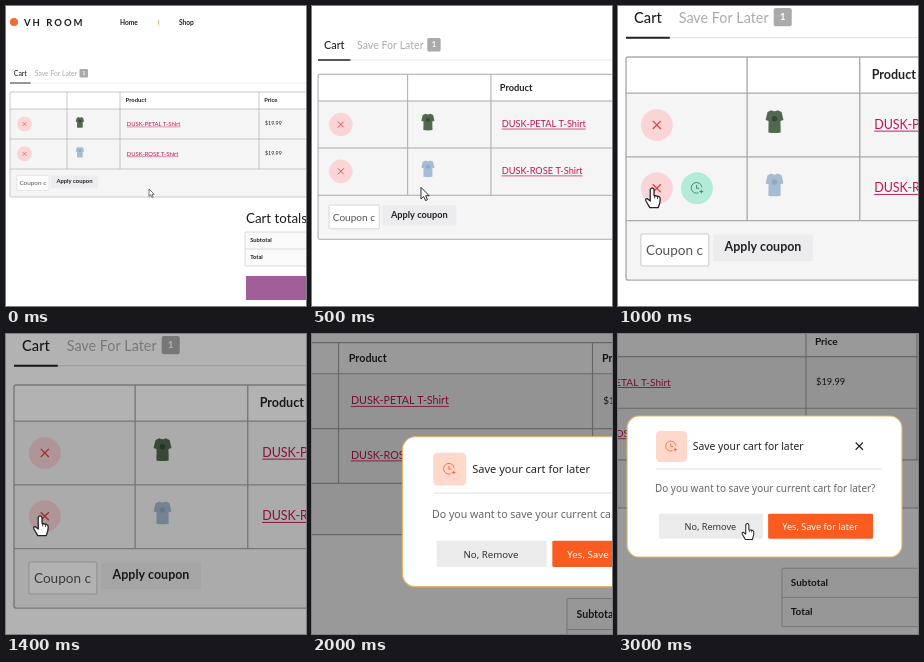
Write an HTML page with a canvas that moves like this. It is 300 px wide and 300 px high and loops after 3.1 s.

```html
<!DOCTYPE html>
<html lang="en">
<head>
<meta charset="utf-8">
<title>Cart demo</title>
<style>
html, body { margin: 0; width: 100%; height: 100%; overflow: hidden; background: #fff; }
canvas { display: block; width: 100vw; height: 100vh; }
</style>
</head>
<body>
<canvas id="stage"></canvas>
<script>
const LOOP = 3100, STEP = 100, SIZE = 300;
const PAGE_FONT = 'Lato, sans-serif';
const POPUP_FONT = '"Noto Sans", sans-serif';
const canvas = document.getElementById('stage');
const ctx = canvas.getContext('2d');

const HAND = new Path2D('M-.9 .7Q0 -.6 .9 .7L.9 3.6 3 4Q3.9 4.3 3.8 5.4L3.6 7 2.9 9.3-1.1 9.3-2.9 6.2Q-3.4 5-2.2 5.1L-.9 6.2Z');
const ARROW = new Path2D('M0 0L0 7.4 1.7 5.8 2.9 8.4 4.1 7.9 3 5.3 5.2 5.3Z');
const SHIRT = new Path2D('M-1.5 -5.2Q0 -4.2 1.5 -5.2L3.3 -4.4 4.2 -.6 2.8 -.2 2.9 5.2Q0 5.8 -2.9 5.2L-2.8 -.2-4.2 -.6-3.3 -4.4Z');

// time, scale, x, y
const CAMERA = [
  [45, 1, 0, 0], [945, 2.125, -0.5, -131.8],
  [1447, 2.125, -0.5, -131.8], [2282, 1.72, -247.2, -154.5]
];
// time, x, y on the page
const POINTER = [
  [0, 143, 183], [500, 69.5, 158], [900, 16.3, 147.6],
  [1900, 16.3, 147.6], [2400, 224, 205], [2900, 224, 205], [3000, 218.9, 200]
];

const clamp = v => Math.min(1, Math.max(0, v));
const smooth = p => p * p * (3 - 2 * p);
const linear = p => p;

function track(keys, t, ease) {
  let i = 0;
  while (i < keys.length - 2 && t >= keys[i + 1][0]) i++;
  const [a, b] = [keys[i], keys[i + 1]];
  const p = ease(clamp((t - a[0]) / (b[0] - a[0])));
  return a.slice(1).map((v, k) => v + (b[k + 1] - v) * p);
}

function box(x1, y1, x2, y2, fill, radius = 0, stroke, width = 0.5) {
  ctx.beginPath();
  ctx.roundRect(x1, y1, x2 - x1, y2 - y1, radius);
  if (fill) { ctx.fillStyle = fill; ctx.fill(); }
  if (stroke) { ctx.strokeStyle = stroke; ctx.lineWidth = width; ctx.stroke(); }
}

function line(x1, y1, x2, y2, color, width = 0.5) {
  ctx.beginPath();
  ctx.moveTo(x1, y1);
  ctx.lineTo(x2, y2);
  ctx.strokeStyle = color;
  ctx.lineWidth = width;
  ctx.stroke();
}

function disc(x, y, r, color) {
  ctx.beginPath();
  ctx.arc(x, y, r, 0, 7);
  ctx.fillStyle = color;
  ctx.fill();
}

function text(str, x, y, size, color = '#222', weight = 400, font = PAGE_FONT, align = 'left') {
  ctx.font = `${weight} ${size}px ${font}`;
  ctx.textAlign = align;
  ctx.fillStyle = color;
  ctx.fillText(str, x, y);
}

function link(str, x, y, size) {
  text(str, x, y, size, '#c41450');
  line(x, y + 1.1, x + ctx.measureText(str).width, y + 1.1, '#c41450', 0.45);
}

function cross(x, y, r, color, width) {
  line(x - r, y - r, x + r, y + r, color, width);
  line(x - r, y + r, x + r, y - r, color, width);
}

function clock(x, y, r, color) {
  ctx.beginPath();
  ctx.arc(x, y, r, 1.2, 6.2);
  ctx.strokeStyle = color;
  ctx.lineWidth = 0.45;
  ctx.stroke();
  line(x, y - r * 0.55, x, y + 0.2, color, 0.45);
  line(x, y + 0.2, x + r * 0.5, y + 0.2, color, 0.45);
  line(x + r * 0.55, y + r * 0.7, x + r * 1.25, y + r * 0.7, color, 0.45);
  line(x + r * 0.9, y + r * 0.35, x + r * 0.9, y + r * 1.05, color, 0.45);
}

function shirt(x, y, color, print) {
  ctx.save();
  ctx.translate(x, y);
  ctx.fillStyle = color;
  ctx.fill(SHIRT);
  ctx.restore();
  disc(x, y - 1.2, 1.3, print);
}

function header() {
  disc(8, 16, 4, '#f26a2e');
  ctx.letterSpacing = '2px';
  text('VH ROOM', 18, 20, 9.5, '#1c1c1c', 700);
  ctx.letterSpacing = '0px';
  text('Home', 114, 18.7, 6.6, '#222', 700);
  line(152.5, 13.5, 152.5, 19, '#f0a070', 0.7);
  text('Shop', 173, 18.7, 6.6, '#222', 700);
}

function tabs() {
  text('Cart', 7.8, 70.2, 6.9, '#222', 500);
  text('Save For Later', 28.8, 70.2, 6.75, '#ababab');
  box(73.5, 63, 82, 71.6, '#aaa', 1);
  text('1', 77.8, 68.6, 4.8, '#fff', 700, PAGE_FONT, 'center');
  line(4, 77, 330, 77, '#ddd');
  line(4, 77, 24.6, 77, '#222', 0.9);
}

function table(hover) {
  const rule = '#aaa';
  box(4, 86, 340, 191, '#f5f5f6', 1);
  box(4, 86, 340, 103, '#fff');
  box(4, 86, 340, 191, null, 1, rule, 0.65);
  for (const y of [103, 133, 163]) line(4, y, 340, y, rule, 0.65);
  for (const x of [61, 114, 253, 317.5]) line(x, 86, x, 163, rule, 0.65);
  text('Product', 119.6, 96.4, 5.9, '#222', 700);
  text('Price', 258.2, 96.4, 5.9, '#222', 700);

  const rows = [
    ['DUSK-PETAL T-Shirt', 118, '#53694f', '#39463a'],
    ['DUSK-ROSE T-Shirt', 147.8, '#a5bcd4', '#8fa9c4']
  ];
  for (const [name, y, color, print] of rows) {
    disc(18.5, y, 7.5, '#fad5d8');
    cross(18.5, y, 1.9, '#e0443c', 0.6);
    shirt(73.9, y - 1.7, color, print);
    link(name, 120.8, y + 1.8, 5.87);
    text('$19.99', 258.9, y + 1.4, 5.4);
  }
  if (hover) {
    disc(37.4, 147.8, 7.5, '#b3ebd8');
    clock(37.2, 147.6, 2.5, '#4a8272');
  }

  box(11, 169.3, 43, 184.4, '#fff', 0.8, '#ccc');
  text('Coupon c', 13.4, 179.2, 6.4, '#555');
  box(45, 169.5, 92, 182.2, '#ececee', 0.5);
  text('Apply coupon', 50.4, 177.2, 5.86, '#222', 700);
}

function totals() {
  text('Cart totals', 240, 217.3, 13.3, '#1c1c1c');
  box(239, 226, 340, 260, '#fafafa', 0.5, '#bbb');
  line(239, 243, 340, 243, '#bbb');
  text('Subtotal', 244.2, 236.4, 5.8, '#222', 700);
  text('Total', 244.2, 253.2, 5.8, '#222', 700);
  box(240, 270, 340, 294, '#a05f99');
}

function popup() {
  const orange = '#f95b20';
  box(149, 137.5, 308.8, 219.5, '#fff', 7, '#e6b667', 0.6);
  box(165.8, 146.2, 183.9, 164.2, '#fdd8cb', 2.5);
  clock(174.4, 155, 2.9, orange);
  text('Save your cart for later', 187.2, 157.3, 6.03, '#222', 400, POPUP_FONT);
  cross(284, 155, 2.1, '#222', 0.7);
  line(165.8, 168.3, 297, 168.3, '#ddd');
  text('Do you want to save your current cart for later?', 165.2, 181.8, 5.79, '#666', 400, POPUP_FONT);
  box(167.6, 194.4, 228, 208.8, '#ebebec', 0.8);
  text('No, Remove', 197.4, 203.6, 5.3, '#333', 400, POPUP_FONT, 'center');
  box(231, 194.4, 292, 208.8, orange, 0.8);
  text('Yes, Save for later', 261.2, 203.6, 5.3, '#fff', 400, POPUP_FONT, 'center');
}

function pointer(x, y) {
  const shape = x < 26 || x > 167 ? HAND : ARROW;
  ctx.save();
  ctx.translate(x, y);
  ctx.fillStyle = '#fff';
  ctx.fill(shape);
  ctx.strokeStyle = '#222';
  ctx.lineWidth = 0.6;
  ctx.lineJoin = 'round';
  ctx.stroke(shape);
  if (shape === HAND) {
    line(1.2, 3.8, 1.2, 5, '#222', 0.4);
    line(2.5, 4, 2.5, 5.2, '#222', 0.4);
  }
  ctx.restore();
}

function draw(t) {
  const px = Math.round(innerWidth * devicePixelRatio);
  const py = Math.round(innerHeight * devicePixelRatio);
  if (canvas.width !== px || canvas.height !== py) {
    canvas.width = px;
    canvas.height = py;
  }
  const kx = px / SIZE, ky = py / SIZE;
  const [scale, x, y] = track(CAMERA, t, smooth);
  const [mx, my] = track(POINTER, t, t < 1000 ? linear : smooth);
  const shade = clamp((t - 1250) / 200);
  const toStage = () => ctx.setTransform(kx, 0, 0, ky, 0, 0);
  const toPage = () => ctx.setTransform(kx * scale, 0, 0, ky * scale, kx * x, ky * y);

  toStage();
  box(0, 0, SIZE, SIZE, '#fff');
  toPage();
  header();
  tabs();
  table(mx < 61 && shade === 0);
  totals();
  if (shade > 0) {
    toStage();
    box(0, 0, SIZE, SIZE, `rgba(0,0,0,${0.4 * shade})`);
    toPage();
    ctx.globalAlpha = shade;
    popup();
    ctx.globalAlpha = 1;
  }
  pointer(mx, my);
}

const start = performance.now();
function tick() {
  const t = (performance.now() - start) % LOOP;
  draw(Math.floor(t / STEP) * STEP);
  requestAnimationFrame(tick);
}
tick();
</script>
</body>
</html>
```
